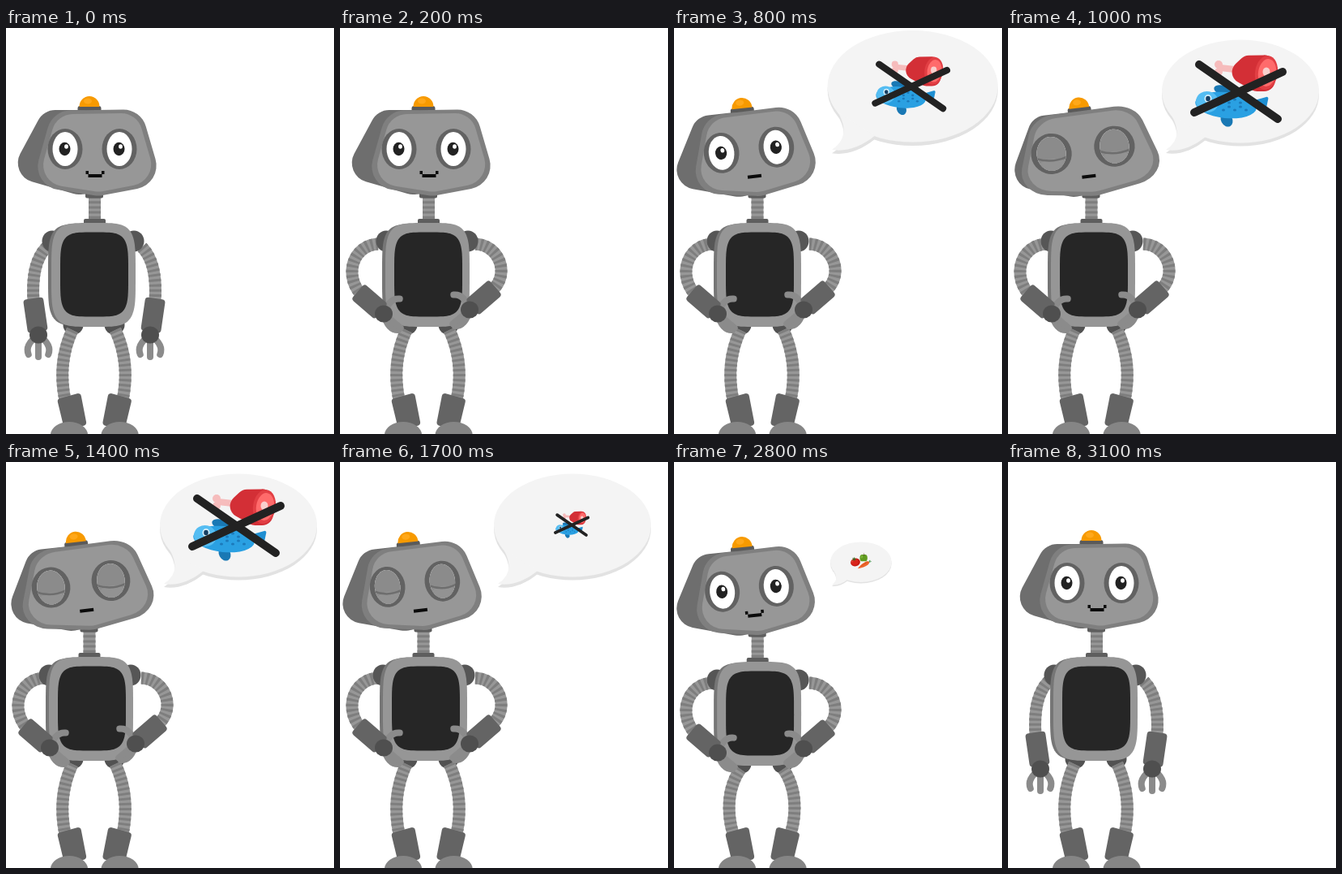
Write an HTML page with a canvas that moves like this. It is 405x500 px and loops after 3.6 s.

```html
<!DOCTYPE html>
<html lang="en">
<head>
<meta charset="utf-8">
<title>Robot talking about food</title>
<style>
html, body { margin: 0; height: 100%; overflow: hidden; background: #fff; }
canvas { display: block; }
</style>
</head>
<body>
<canvas id="stage" width="405" height="500"></canvas>
<script>
const ctx = document.getElementById('stage').getContext('2d');
const LOOP = 3600, STEP = 100, DEG = Math.PI / 180;

// Timing helpers
const ramp = (t, from, to) => Math.min(1, Math.max(0, (t - from) / (to - from)));
const pulse = (t, a, b, c, d) => ramp(t, a, b) - ramp(t, c, d);
const pop = p => p * p * (3 - 2 * p) + .4 * p * Math.sin(Math.PI * p); // swells past 1, then settles
const bump = p => Math.sin(Math.PI * p);
const mix = (a, b, p) => a + (b - a) * p;

function poseAt(t) {
  const lids = pulse(t, 800, 1000, 1800, 2000);
  const talking = t >= 500 && t < 2000;
  const odd = t / STEP % 2 === 1;
  return {
    arms: pulse(t, 0, 200, 2900, 3100),
    lean: Math.sin(pulse(t, 300, 450, 2780, 2900) * Math.PI / 2),
    dip: 6 * bump(ramp(t, 300, 500)) + 7 * bump(ramp(t, 2600, 2900)),
    turn: (1 - Math.cos(4 * Math.PI * ramp(t, 750, 1750))) / 2,
    lids,
    mouth: !talking ? 'smile' : lids < 1 && odd ? 'open' : 'flat',
    bubble: t < 2300 ? pop(ramp(t, 400, 900)) : pop((1 - ramp(t, 2300, 2900)) ** .6),
    meat: pulse(t, 500, 900, 1530, 1800),
    veg: pop(ramp(t, 1800, 2200)) * (1 - ramp(t, 2600, 3100)),
  };
}

// Drawing helpers
function fill(d, color) {
  ctx.fillStyle = color;
  ctx.fill(new Path2D(d));
}
function stroke(d, color, width, cap = 'round') {
  ctx.strokeStyle = color;
  ctx.lineWidth = width;
  ctx.lineCap = cap;
  ctx.stroke(new Path2D(d));
}
function oval(x, y, rx, ry, color, angle = 0) {
  ctx.beginPath();
  ctx.ellipse(x, y, rx, ry, angle, 0, 7);
  ctx.fillStyle = color;
  ctx.fill();
}
function rect(x, y, w, h, color, r = 0) {
  ctx.beginPath();
  ctx.roundRect(x, y, w, h, r);
  ctx.fillStyle = color;
  ctx.fill();
}
function polygon(points, r, color) {
  const [x0, y0] = points[0], [xn, yn] = points[points.length - 1];
  ctx.beginPath();
  ctx.moveTo((x0 + xn) / 2, (y0 + yn) / 2);
  points.forEach(([x, y], i) => {
    const [nx, ny] = points[(i + 1) % points.length];
    ctx.arcTo(x, y, (x + nx) / 2, (y + ny) / 2, r);
  });
  ctx.fillStyle = color;
  ctx.fill();
}
function squircle(cx, cy, rx, ry, color) {
  ctx.beginPath();
  for (let a = 0; a < 360; a += 3) {
    const c = Math.cos(a * DEG), s = Math.sin(a * DEG);
    ctx.lineTo(cx + rx * Math.sign(c) * Math.abs(c) ** .45, cy + ry * Math.sign(s) * Math.abs(s) ** .45);
  }
  ctx.fillStyle = color;
  ctx.fill();
}
function tube(d) {
  stroke(d, '#979797', 15, 'butt');
  ctx.setLineDash([3, 3.2]);
  stroke(d, '#7e7e7e', 15, 'butt');
  ctx.setLineDash([]);
}
function group(draw, x = 0, y = 0, sx = 1, sy = sx, angle = 0) {
  ctx.save();
  ctx.translate(x, y);
  ctx.rotate(angle);
  ctx.scale(sx, sy);
  draw();
  ctx.restore();
}
const scaleAbout = (x, y, s, draw) => group(() => { ctx.translate(-x, -y); draw(); }, x, y, s);

// Draws a left-hand part, then its mirror image
function bothSides(axis, draw) {
  draw(false);
  group(() => draw(true), 2 * axis, 0, -1, 1);
}

// Left arm from shoulder to wrist; both ends of the motion
const HANG = [[50, 270], [36, 284], [32, 308], [34, 337], [40, 378]];
const HIPS = [[47, 266], [18, 267], [4, 302], [25, 327], [54, 352]];
const FINGERS = [[117, 48], [90, 40], [63, -43]];
const armPoints = (p, raise) => HANG.map(([x, y], i) =>
  [mix(x, HIPS[i][0], p), mix(y, HIPS[i][1], p) - (i > 2 ? raise * p : 0)]);

function upperArm([shoulder, bend1, bend2, elbow]) {
  tube(`M${shoulder} C${bend1} ${bend2} ${elbow}`);
}
function foreArm([, , , [ex, ey], [wx, wy]], p) {
  const polar = (r, deg) => [wx + r * Math.cos(deg * DEG), wy + r * Math.sin(deg * DEG)];
  FINGERS.forEach(([hang, hips], i) => {
    const angle = mix(hang, hips, p);
    stroke(`M${wx},${wy} Q${polar(21, angle + 28 * (1 - i))} ${polar(27, angle)}`, '#8b8b8b', 8);
  });
  group(() => rect(-4, -12.5, Math.hypot(wx - ex, wy - ey), 25, '#646464', 4),
    ex, ey, 1, 1, Math.atan2(wy - ey, wx - ex));
  oval(wx, wy, 11, 10.5, '#4f4f4f');
}

function legs(dip) {
  bothSides(108.5, () => {
    oval(83, 366 + dip, 12.5, 11.5, '#525252');
    tube(`M82,${372 + dip} C${69 - dip * .4},400 ${67 - dip * .4},430 73,458`);
  });
  bothSides(109.3, () => {
    polygon([[63, 457], [92, 449], [100, 490], [71, 490]], 4, '#646464');
    oval(78, 501, 23, 16, '#858585');
  });
}

function torso() {
  squircle(102, 304, 50, 63, '#767676');
  squircle(108, 304, 52, 64, '#969696');
  squircle(109, 303.5, 42, 52, '#262626');
}

function eye(x, lids) {
  oval(x, 0, 21.5, 25, '#626262');
  ctx.save();
  ctx.beginPath();
  ctx.ellipse(x, 0, 15.5, 21, 0, 0, 7);
  ctx.clip();
  rect(x - 20, -25, 40, 50, '#fff');
  oval(x - .5, 0, 7, 8.2, '#222');
  oval(x + 1.5, -3, 2.4, 2.8, '#fff');
  if (lids) rect(x - 20, -22, 40, 44 * lids, '#8b8b8b');
  if (lids === 1) {
    oval(x, 22, 19, 16, '#929292');
    stroke(`M${x - 18},3 Q${x},13 ${x + 18},5`, '#6e6e6e', 2.5);
  }
  ctx.restore();
}

function mouth(shape) {
  const pixel = (x, y, w, h = 4) => rect(x, y, w, h, '#0b0b0b');
  if (shape === 'open') {
    for (const y of [25, 33]) pixel(-1, y, 10);
    for (const x of [-4, 8]) pixel(x, 28, 4, 5);
  } else {
    pixel(-5, 31, 17);
    if (shape === 'smile') for (const x of [-8, 11.5]) pixel(x, 27, 3.5);
  }
}

function face(color) {
  polygon([[-49, -47], [60, -49], [87, 43], [8, 58], [-75, 45]], 29, color);
}

function head({ turn, lids, mouth: mouthShape }) {
  const lampX = -3.5 + 5 * turn;
  rect(lampX - 14.5, -53, 29, 9, '#5a5a5a', 3);
  ctx.save();
  ctx.beginPath();
  ctx.rect(lampX - 20, -70, 40, 18);
  ctx.clip();
  oval(lampX, -52, 12.5, 13, '#f79a00');
  oval(lampX - 2, -59, 5, 3.5, '#ffa81a');
  ctx.restore();
  group(() => polygon([[-60, -48], [10, -48], [10, 56], [-20, 56], [-103, 32]], 24, '#6e6e6e'),
    0, 0, 1 - .055 * turn, 1);
  group(() => {
    face('#7f7f7f');
    group(() => face('#979797'), .7, .2, .91);
    bothSides(0, () => {});
    for (const x of [-33.5, 33.5]) eye(x, lids);
  }, 0, 0, 1 + .17 * turn, 1);
  mouth(mouthShape);
}

function meatAndFish() {
  // Leg of meat
  stroke('M262,49 L280,51', '#f6bcbc', 8);
  for (const y of [45, 54]) oval(260, y, 5, 5, '#f6bcbc');
  polygon([[267, 57], [292, 34], [330, 33], [330, 78], [304, 78]], 14, '#d32f36');
  oval(319, 55, 14, 21, '#e23f44', .15);
  oval(320, 55, 11, 17, '#ff6b6b', .15);
  oval(319, 54, 4.5, 5.5, '#f8d0cd');
  // Fish
  polygon([[294, 92], [322, 84], [318, 103]], 2, '#1f8fd2');
  oval(266, 77, 12, 6, '#1978b4', .3);
  oval(270, 113, 7, 9, '#1978b4', -.5);
  oval(269, 95, 38, 16, '#2aa0e2', .1);
  oval(246, 91, 14, 13, '#55bdf2', .2);
  for (let i = 0; i < 10; i++)
    oval(266 + i % 5 * 7, 88 + i % 2 * 4 + (i > 4 ? 9 : 0), 2, 1.6, '#1c79ba');
  oval(247, 87, 4.5, 5, '#d8f1fc');
  oval(247, 87, 2.8, 3.2, '#173f63');
  // Cross
  stroke('M236,45 L333,112', '#222', 10);
  stroke('M230,104 L339,54', '#222', 10);
}

function vegetables() {
  // Apple
  for (const x of [294, 308]) oval(x, 58, 13, 18, '#609b20');
  oval(292, 52, 5, 8, '#7bb53a', .4);
  stroke('M302,45 Q305,40 303,35', '#5a3418', 2.2);
  stroke('M296,43 Q302,47 308,43', '#40740f', 2);
  // Tomato
  oval(257.5, 81, 25.5, 21, '#c81a14', -.2);
  oval(254, 79, 18, 16, '#d9251c', -.2);
  stroke('M239,79 Q240,73 245,70', '#ee6a5c', 3);
  for (let a = 0; a < 5; a++)
    group(() => oval(5, 0, 5.5, 2.2, '#2b6b1c'), 251, 64, 1, 1, (a * 72 - 80) * DEG);
  // Carrot
  for (let i = 0; i < 3; i++) stroke(`M328,81 L${333 + i * 3.5},${71 + i * 3}`, '#2f8a35', 3);
  fill('M270,114 C283,97 304,80 319,76 Q330,74 331,83 C329,95 302,109 270,114Z', '#ec6026');
  stroke('M284,106 Q310,96 326,85', '#f58246', 2.5);
  for (let i = 0; i < 5; i++)
    stroke(`M${288 + i * 7.5},${99 - i * 5} l3,${i % 2 ? 7 : 4}`, '#bf4214', 1.8);
}

function bubble({ bubble: size, meat, veg }) {
  const layer = (dy, color) => {
    oval(287, 78 + dy, 97, 63.5, color);
    if (size > .3) group(() => fill('M202,108 C215,130 206,143 195,150 C210,153 228,147 244,134Z', color), 0, dy);
  };
  scaleAbout(195, 152, size, () => {
    layer(4, '#e2e2e2');
    layer(0, '#f4f4f4');
    scaleAbout(287, 77, meat, meatAndFish);
    scaleAbout(287, 76, veg, vegetables);
  });
}

function draw(t) {
  const pose = poseAt(t), { arms, lean, dip, turn } = pose;
  const withArms = part => bothSides(109 - 2 * arms, right => part(armPoints(arms, right ? 5 : 0), arms));

  ctx.fillStyle = '#fff';
  ctx.fillRect(0, 0, 405, 500);
  legs(dip);
  group(() => {
    withArms(upperArm);
    for (const x of [57, 158]) oval(x - 4 * lean, 262.5, 12.5, 13, '#565656');
    group(() => {
      tube('M109.5,207 V238');
      rect(96, 235, 27, 9, '#5e5e5e', 2);
      rect(98, 202, 22, 7.5, '#5e5e5e', 2);
    }, -6.5 * lean);
    group(torso, -3 * lean);
    withArms(foreArm);
    group(() => head(pose), 106.5 - 14 * lean, 149 + 1.3 * lean, 1, 1, -(6 * lean + .8 * turn) * DEG);
  }, 0, dip);
  if (pose.bubble) bubble(pose);
}

function tick() {
  draw(Math.floor(performance.now() % LOOP / STEP) * STEP);
  requestAnimationFrame(tick);
}
tick();
</script>
</body>
</html>
```
